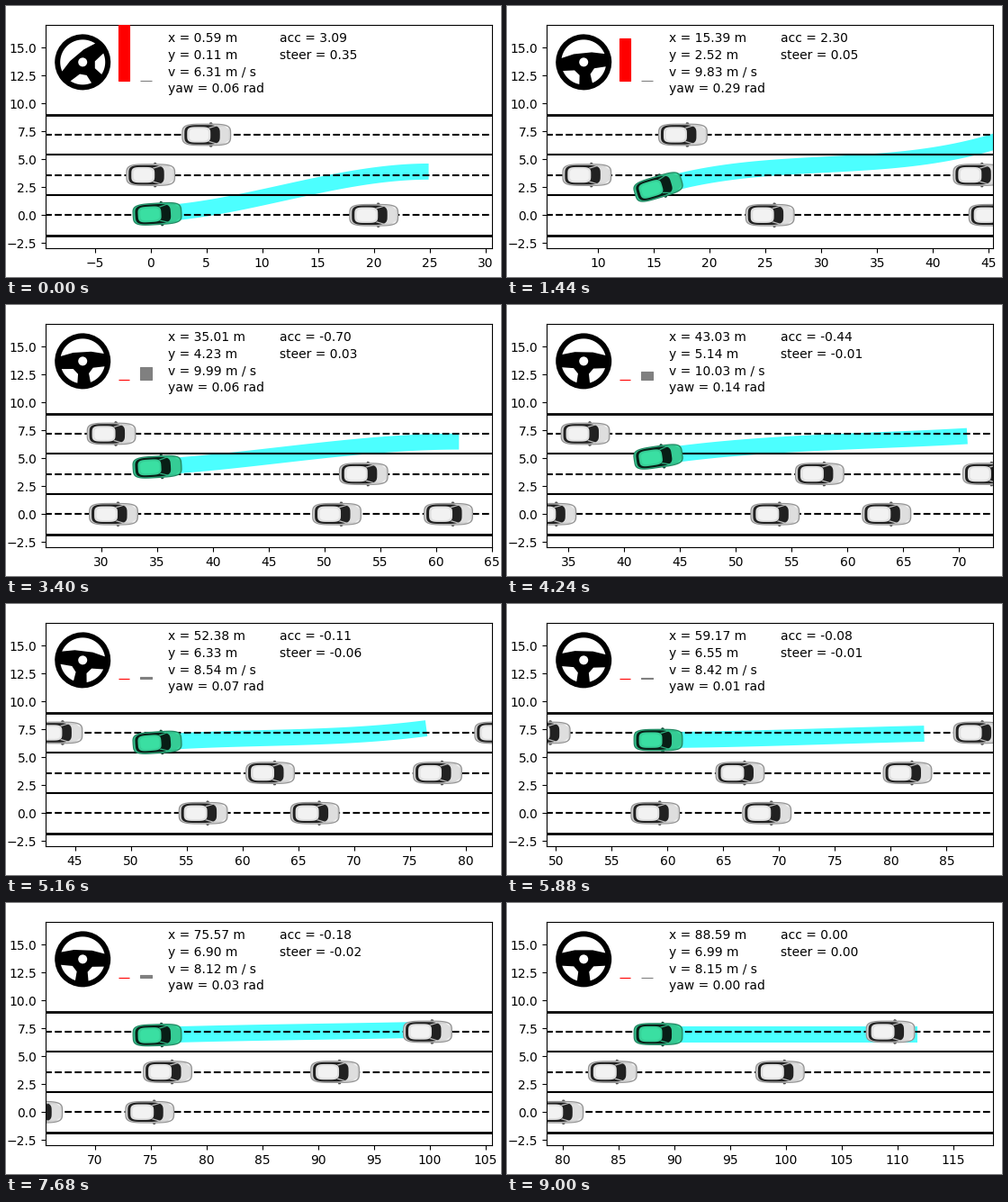
These frames come from a looping animation (550x301 px, 10 s). A matplotlib script:

```python
import numpy as np
import matplotlib.pyplot as plt
from matplotlib.animation import FuncAnimation
from matplotlib.collections import PathCollection
from matplotlib.patches import Circle, Polygon, Rectangle
from matplotlib.path import Path
from matplotlib.ticker import MultipleLocator
from matplotlib.transforms import Affine2D

W, H, DPI = 550, 301, 100
PX = 12.4                       # pixels per metre
LANE = 3.6
TICK, TICKS = 40, 250

# Ego waypoints: tick, step, x, y, speed, yaw, acc, steer,
# then lateral position and slope at the end of the plan
WAYPOINTS = np.array([
    [0, 0, 0.59, 0.11, 6.31, 0.06, 3.09, 0.35, 3.9, 0],
    [36, 18, 15.39, 2.52, 9.83, 0.29, 2.30, 0.05, 7.5, 0.4],
    [85, 37, 35.01, 4.23, 9.99, 0.06, -0.70, 0.03, 6.5, 0],
    [129, 55, 52.38, 6.33, 8.54, 0.07, -0.11, -0.06, 7.6, 0.13],
    [167, 72, 66.63, 6.58, 8.14, 0.02, -0.05, 0.04, 6.57, -0.1],
    [192, 83, 75.57, 6.90, 8.12, 0.03, -0.18, -0.02, 7.35, 0.02],
    [225, 99, 88.59, 6.99, 8.15, 0, 0, 0, 6.99, 0]])
(AT, KNOT, EGO_X, EGO_Y, EGO_V, EGO_YAW,
 ACC, STEER, END_Y, END_SLOPE) = WAYPOINTS.T
VX, VY = EGO_V * np.cos(EGO_YAW), EGO_V * np.sin(EGO_YAW)

# Traffic: start, lane, speed
TRAFFIC = [(20, 0, 3), (40, 0, 3), (50, 0, 3),
           (0, 1, 5), (35, 1, 5), (50, 1, 5),
           (5, 2, 7), (50, 2, 6)]


def cubic(u, p, q, a, b):
    """Value and slope on 0..1 from p to q with end slopes a and b."""
    c2, c3 = 3 * (q - p) - 2 * a - b, a + b - 2 * (q - p)
    return p + u * (a + u * (c2 + u * c3)), a + u * (2 * c2 + 3 * u * c3)


def follow(s, p, m):
    """Value and slope at step s of the curve through the waypoints."""
    i = min(np.searchsorted(KNOT, s, "right") - 1, len(KNOT) - 2)
    h = KNOT[i + 1] - KNOT[i]
    val, slope = cubic((s - KNOT[i]) / h, p[i], p[i + 1],
                       m[i] * h, m[i + 1] * h)
    return val, slope / h


def slab(x0, x1, half, power=4):
    """Rounded box along the x axis, given in pixels."""
    t = np.linspace(0, 2 * np.pi, 49)
    c, s = np.cos(t), np.sin(t)
    x = np.sign(c) * abs(c) ** (2 / power) * (x1 - x0) / 2 + (x0 + x1) / 2
    y = np.sign(s) * abs(s) ** (2 / power) * half
    return Path(np.column_stack([x, y]) / PX)


def pair(pts):
    """A small polygon and its mirror image across the x axis."""
    p = np.array(pts + pts[:1]) / PX
    return [Path(p), Path(p * [1, -1])]


def car_parts():
    """Paths and grey levels of a car seen from above, nose to the right."""
    mirrors = pair([(3, 12), (4, 13.8), (6, 13.6), (7, 12)])
    pillars = pair([(2, 8), (11.5, 10.6), (12.5, 9.8), (3.5, 7)])
    lamps = pair([(20, 9.6), (23.5, 8.8), (25.6, 5.5), (22.5, 7.6)])
    return ([(m, 0.3) for m in mirrors]
            + [(slab(-27.5, 27.5, 12.4), 0.58),
               (slab(-26.3, 26.3, 11.3), 0.82),
               (slab(11, 25, 9), 0.87),
               (slab(-24.5, 15, 10.8), 0.13),
               (slab(-21.5, 4.5, 8.7), 0.88),
               (slab(-19, 2.5, 6.8), 0.95)]
            + [(p, 0.75) for p in pillars]
            + [(p, 0.95) for p in lamps])


def add_car(parts, tint, z):
    paths, greys = zip(*parts)
    car = PathCollection(paths, facecolors=[g * np.array(tint) for g in greys],
                         edgecolors="none", zorder=z)
    ax.add_collection(car, autolim=False)
    return car


def place(car, x, y, yaw=0):
    car.set_transform(Affine2D().rotate(yaw).translate(x, y) + ax.transData)


def arc(r, a, b):
    t = np.radians(np.linspace(a, b, 30))
    return [(r * np.cos(v), r * np.sin(v)) for v in t]


def add_wheel():
    """Steering wheel around its own origin, in pixels."""
    top = arc(25, 16, 164) + [(-10, 10), (10, 10)]
    right = arc(25, 343, 287) + [(6, -14), (11, -8)]
    left = [(-x, y) for x, y in right]
    parts = [Circle((0, 0), 31, fc="black", ec="none")]
    parts += [Polygon(g, fc="white", ec="none") for g in (top, right, left)]
    parts.append(Circle((0, 0), 5, fc="white", ec="none"))
    for p in parts:
        p.set_zorder(3)
        ax.add_patch(p)
    return parts


fig = plt.figure(figsize=(W / DPI, H / DPI), dpi=DPI, facecolor="white")
ax = fig.add_axes([44.05 / W, 31.55 / H, 40 * PX / W, 20 * PX / H])
ax.set_ylim(-3, 17)
ax.xaxis.set_major_locator(MultipleLocator(5))
ax.yaxis.set_major_locator(MultipleLocator(2.5))

# Metres from the left edge of the view, fixed on screen
hud = Affine2D().translate(0, 3).scale(1 / 40, 1 / 20) + ax.transAxes

# Borders every half lane: solid between lanes, dashed along their centres
for k in range(-1, 6):
    style, lw = ("--", 1.5) if k % 2 == 0 else ("-", 2 if k in (-1, 5) else 1.5)
    ax.plot([-100, 300], [k * LANE / 2] * 2, style, color="black", lw=lw)

band = Polygon(np.zeros((3, 2)), fc="cyan", ec="none", alpha=0.7, zorder=1)
ax.add_patch(band)

parts = car_parts()
traffic = [add_car(parts, (1, 1, 1), 2.2) for _ in TRAFFIC]
ego = add_car(parts, (0.24, 0.92, 0.67), 2.3)
wheel = add_wheel()

bars = [Rectangle((u, 12), 1, 0, color=c, lw=0.8, transform=hud, zorder=3)
        for u, c in [(6.5, "red"), (8.5, "gray")]]
for bar in bars:
    ax.add_patch(bar)

FORMATS = ["x = {:.2f} m", "y = {:.2f} m", "v = {:.2f} m / s",
           "yaw = {:.2f} rad", "acc = {:.2f}", "steer = {:.2f}"]
labels = [ax.text(11 + 10 * (i // 4), 15.5 - 1.5 * (i % 4), "",
                  transform=hud, fontsize=10, family="DejaVu Sans")
          for i in range(len(FORMATS))]


def plan_band(s, x, y, v, yaw, acc):
    """Outline of the planned path; it grows with speed and throttle."""
    reach = 2.85 * v + 2.05 * acc
    u = np.linspace(0, 1, 50)
    py, slope = cubic(u, y, np.interp(s, KNOT, END_Y), np.tan(yaw) * reach,
                      np.interp(s, KNOT, END_SLOPE) * reach)
    slope = slope / reach
    side = np.column_stack([-slope, np.ones_like(u)])
    side *= 0.72 / np.hypot(1, slope)[:, None]
    mid = np.column_stack([x + u * reach, py])
    return np.vstack([mid + side, (mid - side)[::-1]])


def update(tick):
    s = int(np.interp(tick, AT, KNOT) + 1e-6)
    x, vx = follow(s, EGO_X, VX / 10)
    y, vy = follow(s, EGO_Y, VY / 10)
    v, yaw = 10 * np.hypot(vx, vy), np.arctan2(vy, vx)
    acc, steer = np.interp(s, KNOT, ACC), np.interp(s, KNOT, STEER)

    ax.set_xlim(x - 10, x + 30)
    band.set_xy(plan_band(s, x, y, v, yaw, acc))
    place(ego, x, y, yaw)
    for car, (start, lane, speed) in zip(traffic, TRAFFIC):
        cx = start + speed * s / 10
        car.set_visible(-13 < cx - x < 33)
        place(car, cx, lane * LANE)

    turn = (Affine2D().rotate(2 * steer).scale(1 / PX)
            .translate(3.32, 13.7) + hud)
    for part in wheel:
        part.set_transform(turn)
    for bar, power in zip(bars, (acc, -acc)):
        bar.set_height(max(power, 0) * 5 / 3)
    for label, form, value in zip(labels, FORMATS,
                                  (x, y, v, yaw, acc, steer)):
        label.set_text(form.format(round(float(value), 2) + 0.0))
    return []


anim = FuncAnimation(fig, update, frames=TICKS, interval=TICK, repeat=True,
                     repeat_delay=0, init_func=lambda: update(0), blit=False)
plt.show()
```
